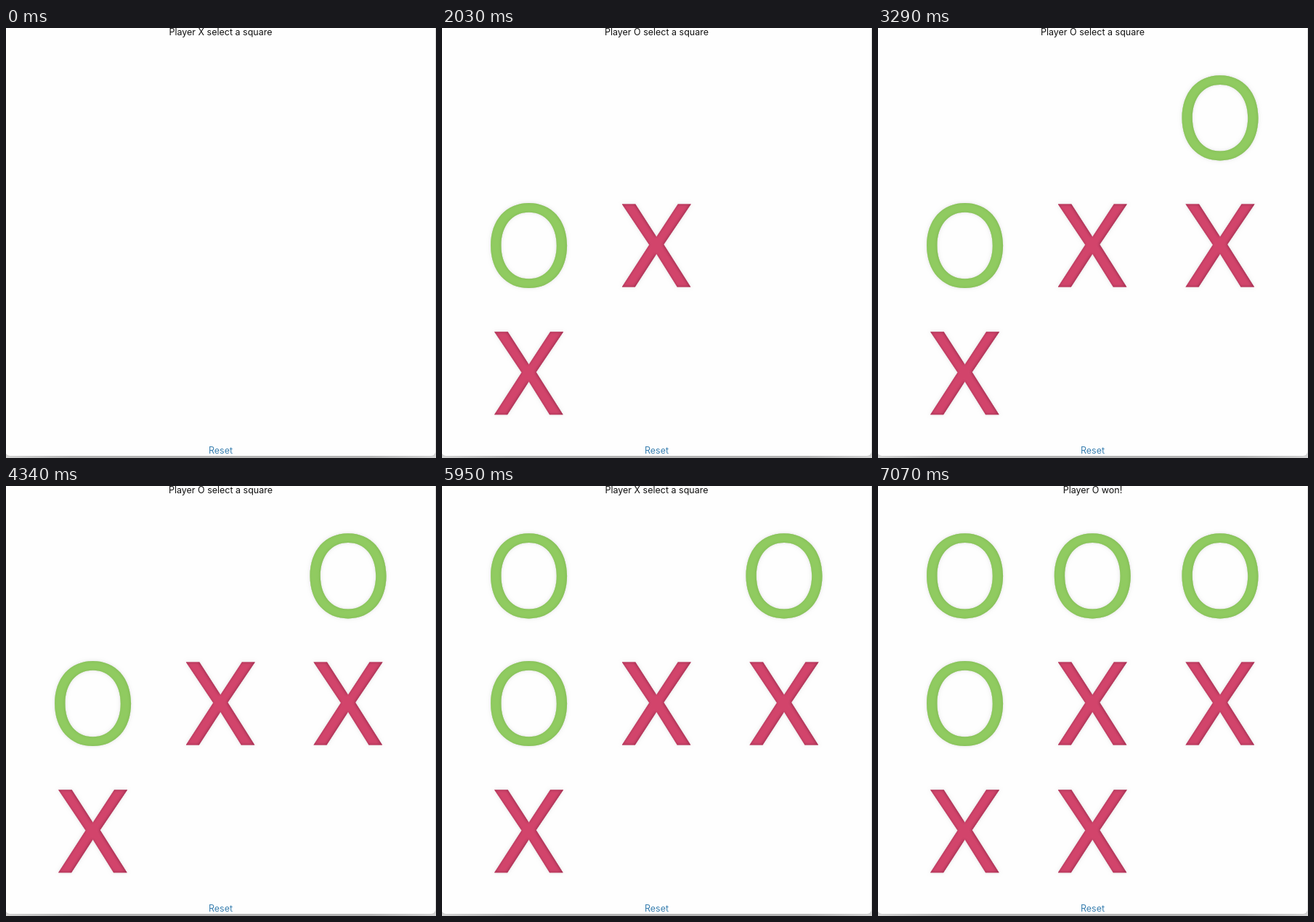
An HTML page with a canvas for the animation above (7.21 s loop, 592 by 592 pixels).

```html
<!DOCTYPE html>
<html lang="en">
<head>
<meta charset="utf-8">
<title>Tic-tac-toe</title>
<style>
  html, body { margin: 0; width: 100%; height: 100%; overflow: hidden; background: #fff; }
  canvas { display: block; width: 592px; height: 592px; }
</style>
</head>
<body>
<canvas id="stage" width="592" height="592"></canvas>
<script>
const ctx = document.getElementById('stage').getContext('2d');
const LOOP = 7210;
const CELL = 175.7;

const MOVES = [
  { at: 280, mark: 'X', col: 1, row: 1 },
  { at: 770, mark: 'O', col: 0, row: 1 },
  { at: 2030, mark: 'X', col: 0, row: 2 },
  { at: 2660, mark: 'O', col: 2, row: 0 },
  { at: 3220, mark: 'X', col: 2, row: 1 },
  { at: 4410, mark: 'O', col: 0, row: 0 },
  { at: 6020, mark: 'X', col: 1, row: 2 },
  { at: 6790, mark: 'O', col: 1, row: 0 }
];

// Rounded oval, a little fuller than an ellipse.
function addOval(path, rx, ry) {
  const k = 0.6, a = rx * k, b = ry * k;
  path.moveTo(0, -ry);
  path.bezierCurveTo(a, -ry, rx, -b, rx, 0);
  path.bezierCurveTo(rx, b, a, ry, 0, ry);
  path.bezierCurveTo(-a, ry, -rx, b, -rx, 0);
  path.bezierCurveTo(-rx, -b, -a, -ry, 0, -ry);
  path.closePath();
}

function ringPath() {
  const path = new Path2D();
  addOval(path, 52.5, 58.6);
  addOval(path, 38.2, 45.8);
  return path;
}

function crossPath() {
  const path = new Path2D();
  const points = [
    [-47.5, -57], [-29, -57], [0, -12], [29.5, -57], [47.5, -57], [10, -1.5],
    [47, 57], [28.5, 57], [0, 11.5], [-29.5, 57], [-47.5, 57], [-10, -1]
  ];
  points.forEach(([x, y]) => path.lineTo(x, y));
  path.closePath();
  return path;
}

const SHAPES = {
  X: { path: crossPath(), fill: '#d2446b', edge: 'rgba(130,35,65,0.8)' },
  O: { path: ringPath(), fill: '#90cb60', edge: 'rgba(110,165,70,0.45)' }
};

function drawMark({ mark, col, row }) {
  const { path, fill, edge } = SHAPES[mark];
  ctx.save();
  ctx.translate(119.6 + col * CELL, 123.8 + row * CELL);
  ctx.fillStyle = fill;
  ctx.shadowColor = 'rgba(0,0,0,0.12)';
  ctx.shadowBlur = 5;
  ctx.fill(path, 'evenodd');

  // Soft inner edge: the shadow of everything outside the shape.
  ctx.clip(path, 'evenodd');
  const outside = new Path2D();
  outside.rect(-90, -90, 180, 180);
  outside.addPath(path);
  ctx.shadowColor = edge;
  ctx.shadowBlur = 4;
  ctx.shadowOffsetX = -0.8;
  ctx.fillStyle = fill;
  ctx.fill(outside, 'evenodd');
  ctx.restore();
}

function drawWindow() {
  const edge = ctx.createLinearGradient(0, 0, 592, 0);
  edge.addColorStop(0, '#d2d2d2');
  edge.addColorStop(0.15, '#b4b4b4');
  edge.addColorStop(0.85, '#b4b4b4');
  edge.addColorStop(1, '#d2d2d2');
  ctx.fillStyle = edge;
  ctx.fillRect(0, 0, 592, 592);
  ctx.fillStyle = '#fefefe';
  ctx.beginPath();
  ctx.roundRect(-0.5, -1, 591.7, 590, [2, 2, 6, 6]);
  ctx.fill();
}

function drawText(text, baseline, color) {
  ctx.fillStyle = color;
  ctx.fillText(text, 295.5, baseline);
}

function render(time) {
  const played = MOVES.filter(move => move.at <= time);
  const won = played.length === MOVES.length;
  const player = won || played.length % 2 ? 'O' : 'X';
  drawWindow();
  played.forEach(drawMark);
  ctx.font = '12.5px Inter, Roboto, sans-serif';
  ctx.textAlign = 'center';
  drawText(`Player ${player} ${won ? 'won!' : 'select a square'}`, 10, '#111');
  drawText('Reset', 586, '#3b80b0');
}

const start = performance.now();
function tick() {
  render((performance.now() - start) % LOOP);
  requestAnimationFrame(tick);
}
tick();
</script>
</body>
</html>
```
